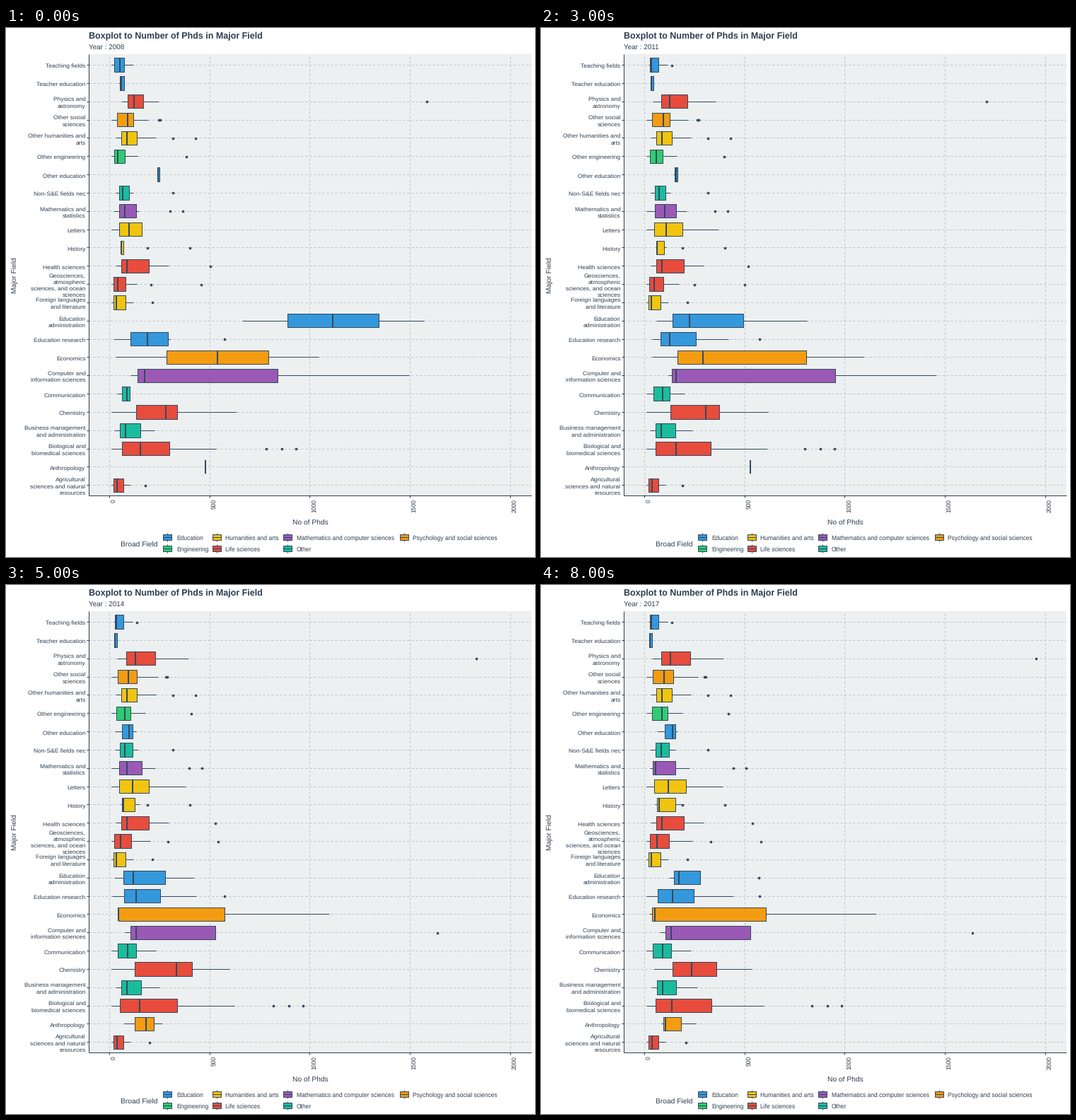
These frames come from a looping animation (748x748 px, 9 s). A matplotlib script:

```python
import matplotlib.pyplot as plt
import numpy as np
from matplotlib.animation import FuncAnimation
from matplotlib.collections import LineCollection, PolyCollection
from matplotlib.patches import Rectangle

SIZE, DPI = 748, 100
PX = 72 / DPI
LEFT, RIGHT, TOP, BOTTOM = 117, 743, 37, 661
ROW0, ROW_STEP, HALF_BOX = 52, 25.84, 9.7
LOWEST = 149
INK, LINE, PANEL, GRID = "#2c3e50", "#34495e", "#ecf0f1", "#bdc3c7"
YEARS = [2008, 2009, 2010, 2011, 2012, 2014, 2015, 2016, 2017]

EDU, ENG, HUM, LIFE = "#3498db", "#2ecc71", "#f1c40f", "#e74c3c"
MATH, OTHER, SOC = "#9b59b6", "#1abc9c", "#f39c12"


class Field:
    """Boxes (q1, median, q3, high whisker) at key years, linear in between."""

    def __init__(self, label, color, boxes, dots=(), drift=0, since=YEARS[0]):
        self.label, self.color, self.boxes = label, color, boxes
        self.dots, self.drift, self.since = dots, drift, since

    def box(self, year):
        keys = list(self.boxes)
        q1, med, q3, high = (np.interp(year, keys, col)
                             for col in zip(*self.boxes.values()))
        # the low whisker mirrors the lower half of the box
        low = min(q1, max(LOWEST, 2 * q1 - med))
        return low, q1, med, q3, high

    def outliers(self, year):
        if year < self.since:
            return []
        t = (year - YEARS[0]) / (YEARS[-1] - YEARS[0])
        return [x + self.drift * t for x in self.dots]


FIELDS = [
    Field("Teaching fields", EDU,
          {2008: (153, 161, 167, 180), 2011: (154, 156, 166, 179)}, (185,), since=2010),
    Field("Teacher education", EDU,
          {2008: (161, 163, 167, 168), 2012: (153, 154, 157, 158)}),
    Field("Physics and\nastronomy", LIFE,
          {2008: (172, 181, 194, 216), 2012: (170, 183, 211, 258)}, (595,), drift=105),
    Field("Other social\nsciences", SOC,
          {2008: (157, 172, 180, 201), 2017: (158, 174, 187, 222)}, (216, 218), drift=15),
    Field("Other humanities and\narts", HUM, {2008: (163, 171, 185, 212)}, (236, 268)),
    Field("Other engineering", ENG,
          {2008: (153, 158, 168, 187), 2016: (157, 171, 179, 200)}, (255,), drift=10),
    Field("Other education", EDU,
          {2008: (214, 215, 217, 217), 2012: (181, 183, 185, 185),
           2014: (164, 174, 179, 184), 2016: (177, 198, 224, 250),
           2017: (175, 186, 190, 193)}),
    Field("Non-S&E fields nec", OTHER,
          {2008: (160, 165, 174, 180), 2017: (162, 170, 181, 190)}, (236,)),
    Field("Mathematics and\nstatistics", MATH,
          {2008: (160, 168, 184, 188), 2012: (161, 177, 193, 212),
           2017: (158, 162, 190, 210)}, (232, 250), drift=40),
    Field("Letters", HUM,
          {2008: (160, 174, 192, 192), 2010: (160, 177, 199, 250),
           2017: (160, 180, 205, 257)}),
    Field("History", HUM,
          {2008: (163, 163, 166, 166), 2017: (164, 167, 190, 200)}, (200, 260)),
    Field("Health sciences", LIFE, {2008: (163, 171, 202, 230)}, (289,), drift=10),
    Field("Geosciences,\natmospheric\nsciences, and ocean\nsciences", LIFE,
          {2008: (152, 158, 169, 185), 2017: (154, 164, 181, 214)}, (205, 276), drift=35),
    Field("Foreign languages\nand literature", HUM, {2008: (152, 156, 169, 180)}, (207,)),
    Field("Education\nadministration", EDU,
          {2008: (398, 462, 527, 591), 2010: (203, 235, 337, 437),
           2012: (170, 185, 235, 316), 2016: (163, 175, 216, 216),
           2017: (188, 195, 225, 225)}, (308,), since=2016),
    Field("Education research", EDU,
          {2008: (176, 200, 229, 232), 2010: (170, 181, 220, 264),
           2017: (165, 186, 216, 272)}, (309,)),
    Field("Economics", SOC,
          {2010: (227, 299, 371, 442), 2012: (159, 159, 380, 472),
           2014: (159, 159, 309, 457), 2017: (157, 161, 318, 474)}),
    Field("Computer and\ninformation sciences", MATH,
          {2008: (186, 196, 384, 570), 2010: (185, 190, 360, 529),
           2012: (186, 192, 473, 590), 2014: (176, 184, 296, 296)}, (610,), since=2014),
    Field("Communication", OTHER,
          {2008: (164, 171, 175, 175), 2012: (158, 172, 184, 212)}),
    Field("Chemistry", LIFE,
          {2008: (184, 226, 242, 326), 2014: (182, 241, 263, 316),
           2017: (186, 213, 248, 298)}),
    Field("Business management\nand administration", OTHER,
          {2008: (161, 169, 190, 210), 2017: (164, 172, 191, 221)}),
    Field("Biological and\nbiomedical sciences", LIFE,
          {2008: (164, 190, 231, 297), 2012: (161, 191, 243, 328),
           2017: (162, 185, 241, 315)}, (368, 390, 410), drift=15),
    Field("Anthropology", SOC,
          {2008: (282,) * 4, 2012: (301,) * 4, 2014: (182, 198, 209, 221),
           2017: (173, 176, 198, 219)}),
    Field("Agricultural\nsciences and natural\nresources", LIFE,
          {2008: (152, 157, 166, 176)}, (197,), drift=8),
]

plt.rcParams.update({"font.family": "Liberation Sans", "text.hinting": "none"})
fig = plt.figure(figsize=(SIZE / DPI, SIZE / DPI), dpi=DPI, facecolor="white")
ax = fig.add_axes([0, 0, 1, 1])
ax.set_xlim(0, SIZE)
ax.set_ylim(SIZE, 0)
ax.axis("off")


def text(x, y, s, size, **kw):
    return ax.text(x, y, s, fontsize=size * PX, color=INK, va="baseline",
                   rotation_mode="anchor", **kw)


def line(x0, y0, x1, y1, color=INK, z=2, **kw):
    ax.plot([x0, x1], [y0, y1], color=color, lw=PX, zorder=z,
            solid_capstyle="butt", **kw)


def row_y(i):
    return ROW0 + ROW_STEP * i


def draw_axes():
    dash = dict(color=GRID, z=1, linestyle=(0, (3, 3)))
    ax.add_patch(Rectangle((LEFT, TOP), RIGHT - LEFT, BOTTOM - TOP,
                           fc=PANEL, ec="none", zorder=0))
    for k in range(5):
        x = 146 + 141.75 * k
        line(x, BOTTOM, x, TOP, **dash)
        line(x, BOTTOM, x, BOTTOM + 3)
        text(x + 8.5, 666, str(500 * k), 8.55, rotation=90, ha="right")
    for i, field in enumerate(FIELDS):
        y = row_y(i)
        line(LEFT, y, RIGHT, y, **dash)
        line(LEFT - 3, y, LEFT, y)
        rows = field.label.split("\n")
        for j, s in enumerate(rows):
            text(112.5, y + 4.5 + 9.2 * (j - (len(rows) - 1) / 2), s, 8.5, ha="right")
    line(LEFT, TOP, LEFT, BOTTOM)
    line(LEFT, BOTTOM, RIGHT, BOTTOM)
    text(LEFT, 15, "Boxplot to Number of Phds in Major Field", 12.5, weight="bold")
    text(430, 702, "No of Phds", 10.3, ha="center")
    text(14.5, 349.5, "Major Field", 10.3, ha="center", rotation=90)


def draw_key(x, y, color, label):
    line(x, y - 6, x, y + 6, LINE)
    ax.add_patch(Rectangle((x - 6, y - 4), 12, 8, fc=color, ec=LINE, lw=PX, zorder=3))
    line(x - 6, y, x + 6, y, LINE, 4)
    text(x + 12.5, y + 4, label, 8.55)


def draw_legend():
    text(162, 733, "Broad Field", 10.3)
    columns = [(228.5, [(EDU, "Education"), (ENG, "Engineering")]),
               (298, [(HUM, "Humanities and arts"), (LIFE, "Life sciences")]),
               (398.5, [(MATH, "Mathematics and computer sciences"), (OTHER, "Other")]),
               (563, [(SOC, "Psychology and social sciences")])]
    for x, keys in columns:
        for j, (color, label) in enumerate(keys):
            draw_key(x, 720.4 + 15.7 * j, color, label)


draw_axes()
draw_legend()
year_text = text(LEFT, 31, "", 9.9)
whiskers = LineCollection([], colors=LINE, linewidths=PX, zorder=3, snap=True)
boxes = PolyCollection([], facecolors=[f.color for f in FIELDS], edgecolors=LINE,
                       linewidths=PX, zorder=4, snap=True)
medians = LineCollection([], colors=LINE, linewidths=2 * PX, zorder=5,
                         snap=True, capstyle="butt")
for c in (whiskers, boxes, medians):
    ax.add_collection(c, autolim=False)
dots = ax.scatter([], [], s=7.2, color=LINE, linewidths=0, zorder=6)


def show(frame):
    year = YEARS[frame]
    arms, rects, mids, points = [], [], [], []
    for i, field in enumerate(FIELDS):
        y = row_y(i)
        low, q1, med, q3, high = field.box(year)
        top, bottom = y - HALF_BOX, y + HALF_BOX
        arms += [[(low, y), (q1, y)], [(q3, y), (high, y)]]
        rects.append([(q1, top), (q3, top), (q3, bottom), (q1, bottom)])
        mids.append([(med, top), (med, bottom)])
        points += [(x + 0.5, y + 0.5) for x in field.outliers(year)]
    whiskers.set_segments(arms)
    boxes.set_verts(rects)
    medians.set_segments(mids)
    dots.set_offsets(points)
    year_text.set_text(f"Year : {year}")
    return whiskers, boxes, medians, dots, year_text


anim = FuncAnimation(fig, show, frames=len(YEARS), interval=1000, repeat=True)
plt.show()
```
